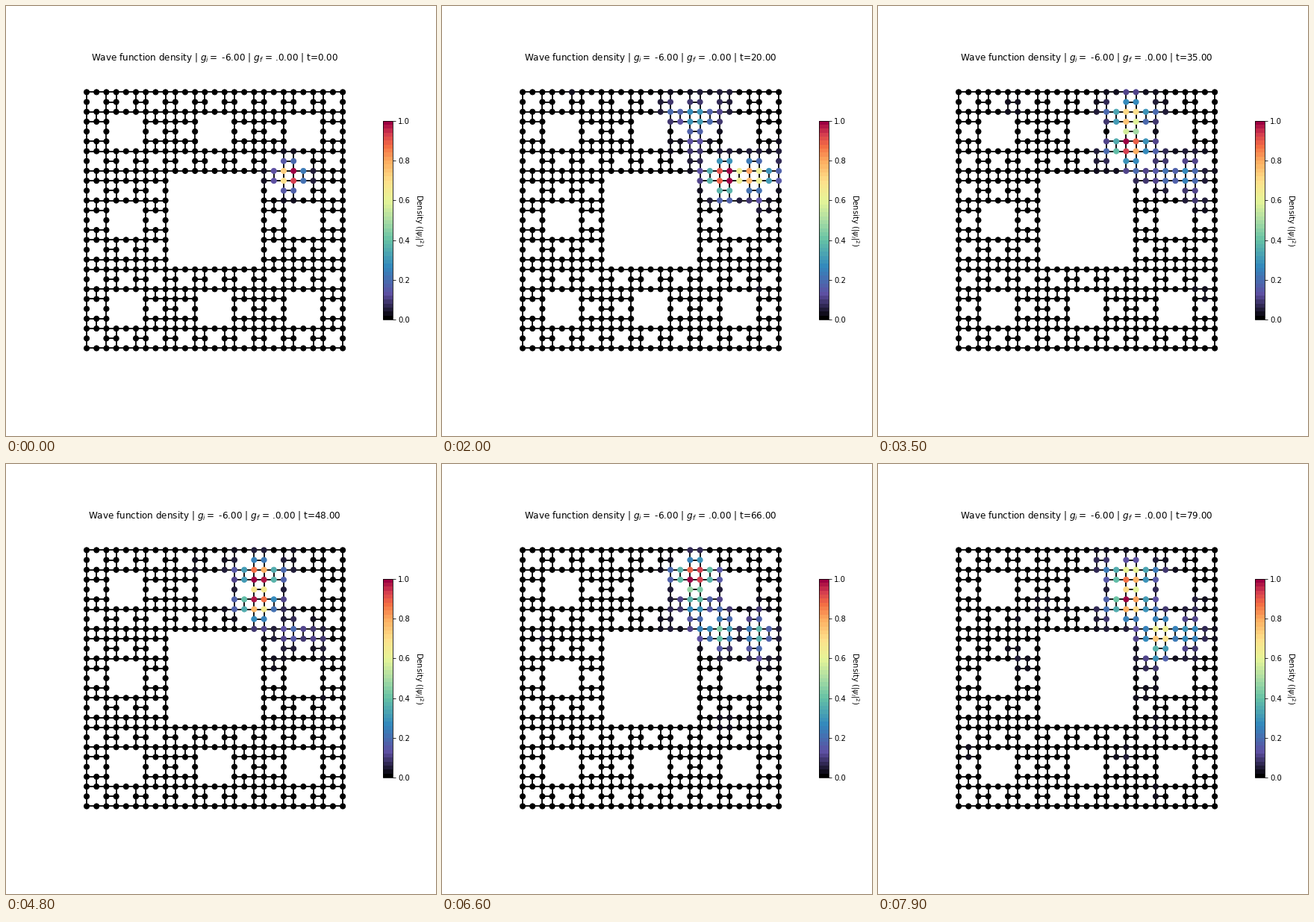
Recreate the animation shown at these times as a matplotlib script. Size 576x576 px, loop 8000 ms.

```python
import numpy as np
import matplotlib.pyplot as plt
from matplotlib.animation import FuncAnimation
from matplotlib.cm import ScalarMappable
from matplotlib.collections import LineCollection
from matplotlib.colors import LinearSegmentedColormap, Normalize

SIZE, DPI = 576, 72
N = 27                      # third-generation Sierpinski carpet
G_I = -6.0                  # attraction before the quench
CENTER = np.array([279.58, 286.9])
STEP = 13.196
FRAMES, INTERVAL = 80, 100

plt.rcParams["font.family"] = "DejaVu Sans"


def in_carpet(x, y):
    while x or y:
        if x % 3 == 1 and y % 3 == 1:
            return False
        x, y = x // 3, y // 3
    return True


# Lattice sites and nearest-neighbour bonds
sites = [(x, y) for y in range(N) for x in range(N) if in_carpet(x, y)]
index = {s: k for k, s in enumerate(sites)}
bonds = np.array([(k, index[nb])
                  for (x, y), k in index.items()
                  for nb in ((x + 1, y), (x, y + 1)) if nb in index])
pos = np.array(sites, float)

H = np.zeros((len(sites), len(sites)))
H[bonds[:, 0], bonds[:, 1]] = H[bonds[:, 1], bonds[:, 0]] = -1.0


def trapped_state(peak=0.19):
    """Lowest state in the well dug by the packet's own density."""
    columns = {19: 0.13, 20: 0.72, 21: 1.0, 22: 0.25}
    rows = {7: 0.16, 8: 1.0, 9: 0.93, 10: 0.16}
    rho = np.array([columns.get(x, 0) * rows.get(y, 0) for x, y in sites])
    return np.linalg.eigh(H + np.diag(G_I * peak * rho))[1][:, 0]


# After the quench the evolution is linear
energy, modes = np.linalg.eigh(H)
weights = modes.T @ trapped_state()


def density(t):
    rho = np.abs(modes @ (np.exp(-1j * energy * t) * weights)) ** 2
    return rho / rho.max()


cmap = LinearSegmentedColormap.from_list("density", [
    (0.00, "#000000"), (0.12, "#5e4fa2"), (0.26, "#3288bd"),
    (0.40, "#66c2a5"), (0.50, "#abdda4"), (0.60, "#e6f598"),
    (0.70, "#fee08b"), (0.80, "#fdae61"), (0.88, "#f46d43"),
    (0.94, "#d53e4f"), (1.00, "#9e0142")], N=50)
norm = Normalize(0, 1)

fig = plt.figure(figsize=(SIZE / DPI, SIZE / DPI), dpi=DPI, facecolor="white")
ax = fig.add_axes([0, 0, 1, 1])
ax.set_xlim(0, SIZE)
ax.set_ylim(SIZE, 0)
ax.axis("off")

xy = CENTER + STEP * (pos - (N - 1) / 2)
ax.add_collection(LineCollection(xy[bonds], colors="black", linewidths=1.8, zorder=1))
nodes = ax.scatter(xy[:, 0], xy[:, 1], s=50, c=np.zeros(len(sites)),
                   cmap=cmap, norm=norm, linewidths=1, zorder=2)
title = ax.text(CENTER[0], 73, "", fontsize=12, ha="center", va="baseline")

BAR_W, BAR_H = 13.306, 266.112
cax = fig.add_axes([505 / SIZE, 156.05 / SIZE, BAR_W / SIZE, BAR_H / SIZE])
bar = fig.colorbar(ScalarMappable(norm, cmap), cax=cax, ticks=np.linspace(0, 1, 6))
bar.set_label(r"Density ($|\psi_i|^2$)", fontsize=10, rotation=270, labelpad=20)


def update(t):
    nodes.set_array(density(t))
    title.set_text(f"Wave function density | $g_i=$ {G_I:.2f} | $g_f$ = .0.00 | t={t:.2f}")
    return nodes, title


anim = FuncAnimation(fig, update, frames=FRAMES, interval=INTERVAL,
                     repeat=True, repeat_delay=0, blit=False)
plt.show()
```
